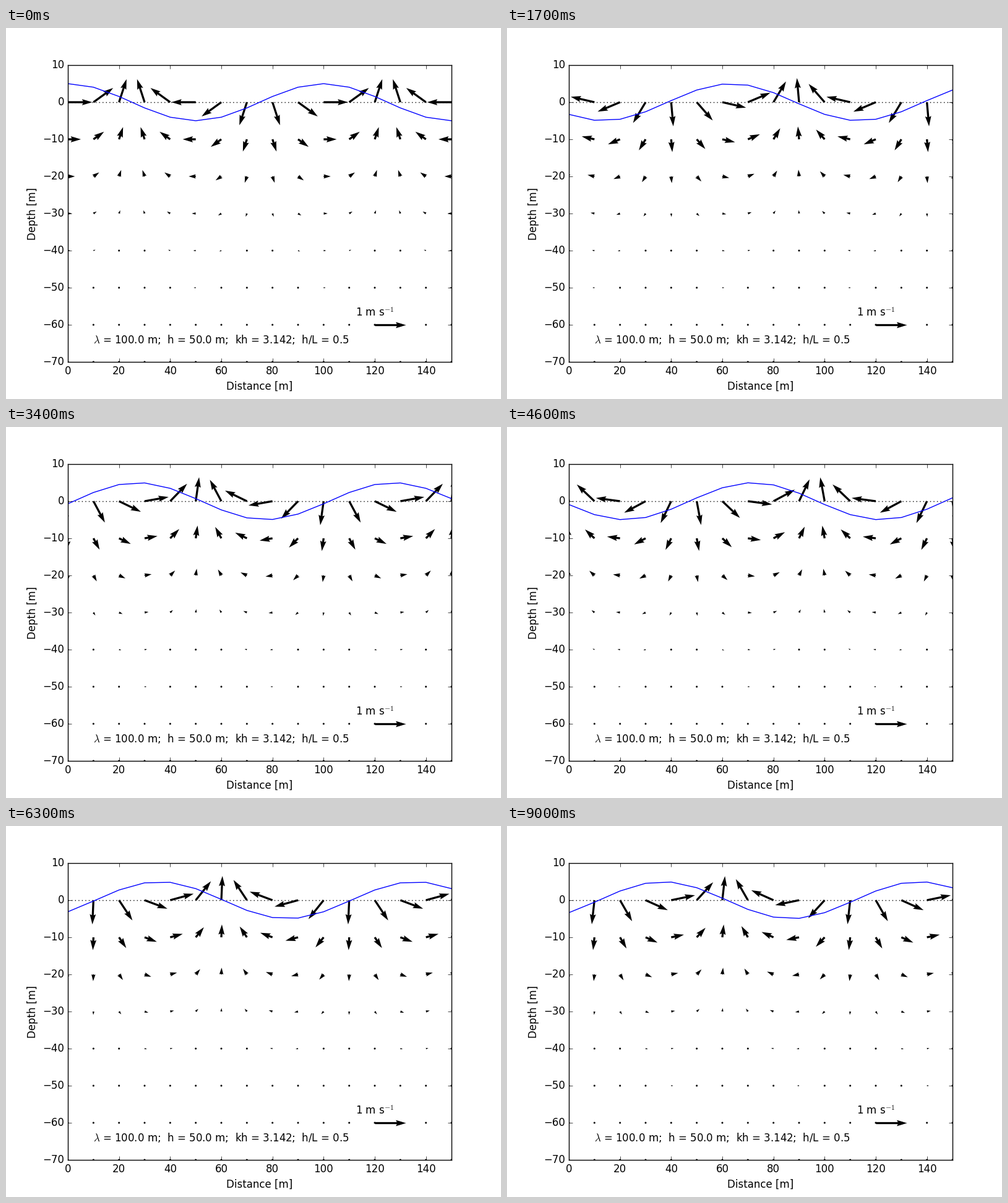
Write a matplotlib script that moves like this. It is 800 px wide and 600 px high and loops after 9100 ms.

```python
import matplotlib.pyplot as plt
import numpy as np
from matplotlib.animation import FuncAnimation

plt.style.use("classic")
plt.rcParams.update({
    "figure.dpi": 100,
    "figure.facecolor": "white",
    "font.family": "DejaVu Sans",
})

FRAMES, INTERVAL = 91, 100
TIME_STEP = 0.3       # seconds of wave time per frame
WAVELENGTH = 100.0
DEPTH = 50.0
CREST = 5.0           # height of the drawn surface
G = 9.81

k = 2 * np.pi / WAVELENGTH
kh = k * DEPTH
omega = np.sqrt(G * k * np.tanh(kh))

x = np.arange(0, 151, 10)
z = np.arange(-70, 1, 10)
X, Z = np.meshgrid(x, z)

# Orbital velocity amplitudes of a unit wave; still below the bed
in_water = Z >= -DEPTH
u_amp = np.where(in_water, omega * np.cosh(k * (Z + DEPTH)) / np.sinh(kh), 0)
w_amp = np.where(in_water, omega * np.sinh(k * (Z + DEPTH)) / np.sinh(kh), 0)


def surface(t):
    return CREST * np.cos(k * x - omega * t)


def velocity(t):
    phase = k * X - omega * t
    return u_amp * np.cos(phase), w_amp * np.sin(phase)


fig, ax = plt.subplots(figsize=(8, 6))
ax.set_xlim(0, 150)
ax.set_ylim(-70, 10)
ax.set_xlabel("Distance [m]")
ax.set_ylabel("Depth [m]")

arrow_style = dict(units="inches", scale=2, color="k",
                   width=0.06 * 6.2 / np.sqrt(X.size))
arrows = ax.quiver(X, Z, *velocity(0), **arrow_style)
ax.plot([0, 150], [0, 0], "k:")
wave, = ax.plot(x, surface(0), "b-")

# Velocity key and wave parameters
ax.quiver([120], [-60], [1], [0], zorder=1.1, **arrow_style)
ax.text(120, -60 + 10 / 6, "1 m s$^{-1}$", ha="center", va="bottom")
ax.text(10, -65, rf"$\lambda$ = {WAVELENGTH} m;  h = {DEPTH} m;  "
                 f"kh = {kh:.3f};  h/L = {DEPTH / WAVELENGTH}")


def update(frame):
    t = frame * TIME_STEP
    wave.set_ydata(surface(t))
    arrows.set_UVC(*velocity(t))
    return wave, arrows


anim = FuncAnimation(fig, update, frames=FRAMES, interval=INTERVAL,
                     repeat=True, repeat_delay=0)
plt.show()
```
